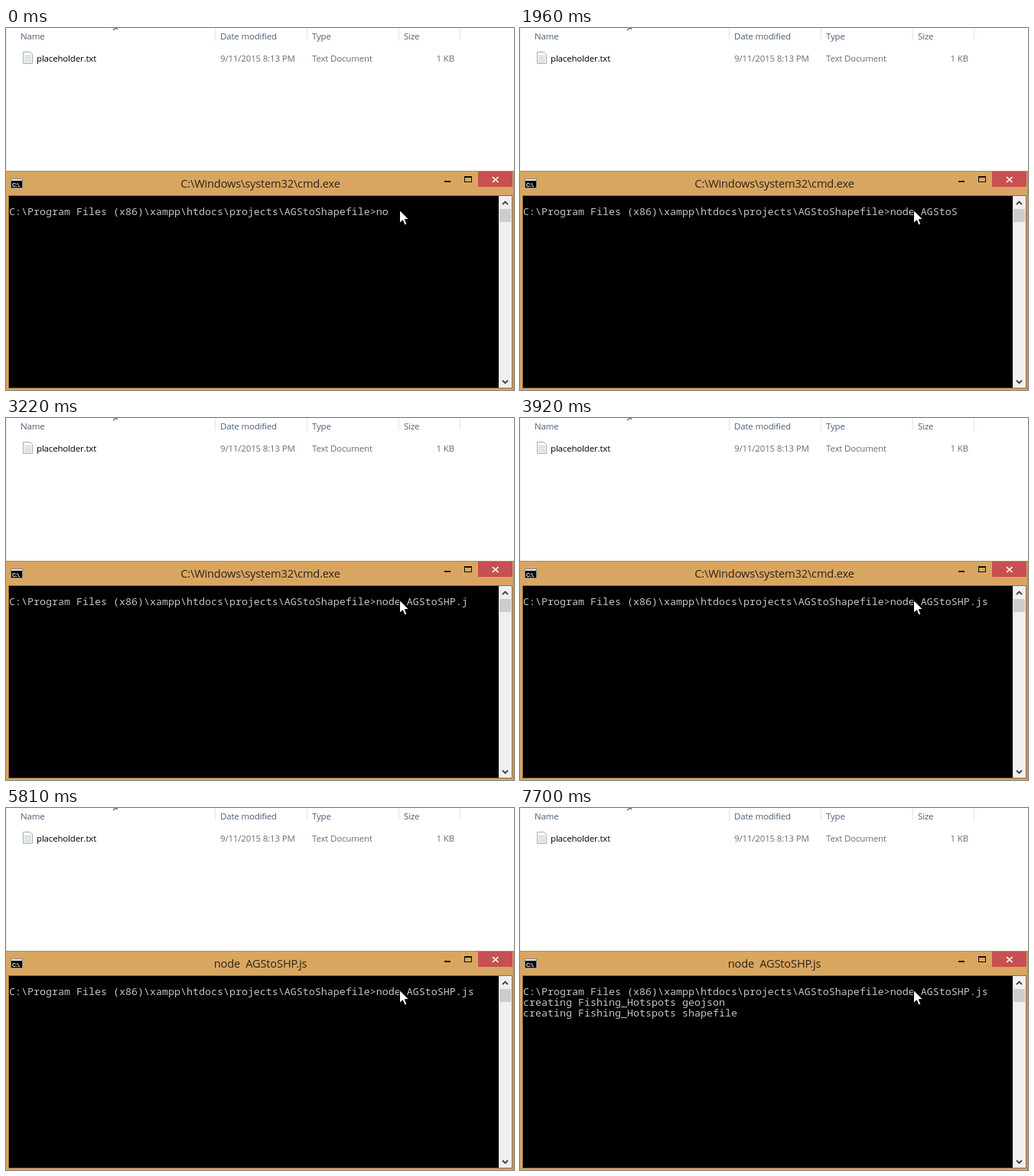
An HTML page with a canvas that plays this animation: 664x474 px, repeating every 8000 ms.

```html
<!DOCTYPE html>
<html lang="en">
<head>
<meta charset="utf-8">
<title>Console</title>
<style>
  html, body { margin: 0; width: 664px; height: 474px; overflow: hidden; background: #fff; }
  canvas { display: block; }
</style>
</head>
<body>
<canvas id="stage" width="664" height="474"></canvas>
<script>
const ctx = document.getElementById('stage').getContext('2d');
const LOOP = 8000, STEP = 70;
const UI = '"Open Sans", "Noto Sans", sans-serif';
const MONO = '500 13.3333px "Noto Sans Mono", "DejaVu Sans Mono", monospace';
const CELL = 8, ROW = 14, LEFT = 4, TOP = 234;
const TAN = '#d9a661', EDGE = '#8c6c40', GRAY = '#c4c4c4';

const PROMPT = 'C:\\Program Files (x86)\\xampp\\htdocs\\projects\\AGStoShapefile>';
const COMMAND = 'node AGStoSHP.js';
const RUN_AT = 3990;
const OUTPUT = [
  [7560, 'creating Fishing_Hotspots geojson'],
  [7700, 'creating Fishing_Hotspots shapefile']
];

// Typing pace: key points of [time, characters typed], linear in between
const PACE = [
  [40, 2], [70, 4], [940, 4], [980, 6], [1260, 7],
  [2100, 12], [2730, 14], [3220, 15], [3290, 16]
];
const BLINK = 475.5, BLINK_START = 60;

function typedAt(t) {
  const time = t + STEP / 2;
  const next = PACE.findIndex(([at]) => at > time);
  if (next === 0) return PACE[0][1];
  if (next < 0) return COMMAND.length;
  const [t0, n0] = PACE[next - 1], [t1, n1] = PACE[next];
  return Math.floor(n0 + (n1 - n0) * (time - t0) / (t1 - t0));
}

const blinksAt = t => Math.floor((t - BLINK_START) / BLINK);
const linesAt = t => OUTPUT.filter(([at]) => t >= at).length;

// Typing or printing hides the caret; every blink flips it
function caretAt(t) {
  let on = false;
  for (let now = STEP; now <= t; now += STEP) {
    const before = now - STEP;
    if (typedAt(now) !== typedAt(before) || linesAt(now) !== linesAt(before)) on = false;
    if (blinksAt(now) !== blinksAt(before)) on = !on;
  }
  return on && !linesAt(t);
}

function rect(x, y, w, h, color) {
  ctx.fillStyle = color;
  ctx.fillRect(x, y, w, h);
}

function path(points) {
  ctx.beginPath();
  points.forEach(([x, y]) => ctx.lineTo(x, y));
}

function line(color, width, ...points) {
  path(points);
  ctx.strokeStyle = color;
  ctx.lineWidth = width;
  ctx.stroke();
}

function shape(fill, stroke, ...points) {
  path(points);
  ctx.closePath();
  ctx.fillStyle = fill;
  ctx.strokeStyle = stroke;
  ctx.lineWidth = 1;
  ctx.fill();
  ctx.stroke();
}

function text(str, x, y, color, font, spacing = 0, align = 'left') {
  ctx.font = font;
  ctx.letterSpacing = spacing + 'px';
  ctx.textAlign = align;
  ctx.fillStyle = color;
  ctx.fillText(str, x, y);
}

function label(str, x, y, color, align) {
  text(str, x, y, color, '11.5px ' + UI, -0.17, align);
}

function drawFiles() {
  const head = '#4c607a', dim = '#6d6d6d';
  rect(0, 0, 664, 187, '#fff');
  rect(0, 0, 1, 187, '#f0f0f0');
  for (const x of [273, 393, 513, 593]) rect(x, 0, 1, 16, '#e5e5e5');
  line('#3f79ad', 1.5, [140, 3], [143.5, 0], [146, 1.5]);

  label('Name', 19, 15, head);
  label('Date modified', 280, 15, head);
  label('Type', 400, 15, head);
  label('Size', 520, 15, head);

  shape('#fafbfb', '#a3adb2', [22.5, 31.5], [31.5, 31.5], [34.5, 34.5], [34.5, 46.5], [22.5, 46.5]);
  for (let y = 36; y < 45; y += 2) rect(24, y, 9, 1, '#c3ced4');
  label('placeholder.txt', 40, 44, '#000');
  label('9/11/2015 8:13 PM', 280, 44, dim);
  label('Text Document', 400, 44, dim);
  label('1 KB', 586, 44, dim, 'right');
}

function chevron(y, dir) {
  line('#404040', 1.8, [649, y], [652.5, y + 3.5 * dir], [656, y]);
}

function drawWindow(title) {
  rect(0, 187, 664, 287, TAN);
  rect(0, 187, 664, 1, '#b58a50');
  rect(663, 187, 1, 287, '#b58a50');

  rect(6, 197, 16, 13, '#8a8a8a');
  rect(7, 198, 14, 2, '#e4e4e4');
  rect(7, 200, 14, 9, '#000');
  text('C:\\.', 8, 207.5, '#fff', 'bold 7px "Liberation Sans", sans-serif', -0.2);
  text(title, 332.5, 209, '#2b2418', '14.6px ' + UI, -0.15, 'center');

  rect(573, 200, 8, 2, '#111');
  rect(599, 194, 10, 8, '#111');
  rect(600, 196, 8, 5, TAN);
  rect(617, 188, 45, 20, '#c75050');
  line('#fff', 1.7, [636, 195], [643.5, 202]);
  line('#fff', 1.7, [643.5, 195], [636, 202]);

  rect(3, 219, 659, 253, EDGE);
  rect(4, 220, 640, 251, '#000');
  rect(644, 220, 17, 251, '#f0f0f0');
  rect(645, 237, 15, 17, '#cdcdcd');
  chevron(231, -1);
  chevron(461.5, 1);
}

function print(str, row) {
  text(str, LEFT, TOP + row * ROW + 11, GRAY, MONO);
}

function drawConsole(t) {
  const typed = typedAt(t);
  print(PROMPT + COMMAND.slice(0, typed), 0);
  OUTPUT.slice(0, linesAt(t)).forEach(([, str], i) => print(str, i + 1));
  if (caretAt(t)) {
    const [col, row] = t < RUN_AT ? [PROMPT.length + typed, 0] : [0, 1];
    rect(LEFT + col * CELL, TOP + row * ROW + 10, CELL, 4, GRAY);
  }
}

function drawPointer() {
  ctx.save();
  ctx.translate(514.5, 238.5);
  shape('#fff', '#000', [0, 0], [0, 17], [4, 13.3], [6.6, 19.5], [9.4, 18.3], [6.9, 12.3], [12, 12]);
  ctx.restore();
}

function draw() {
  const now = performance.now() % LOOP;
  const t = Math.floor(now / STEP) * STEP;
  drawFiles();
  drawWindow(t < RUN_AT ? 'C:\\Windows\\system32\\cmd.exe' : 'node  AGStoSHP.js');
  drawConsole(t);
  drawPointer();
  requestAnimationFrame(draw);
}
draw();
</script>
</body>
</html>
```
